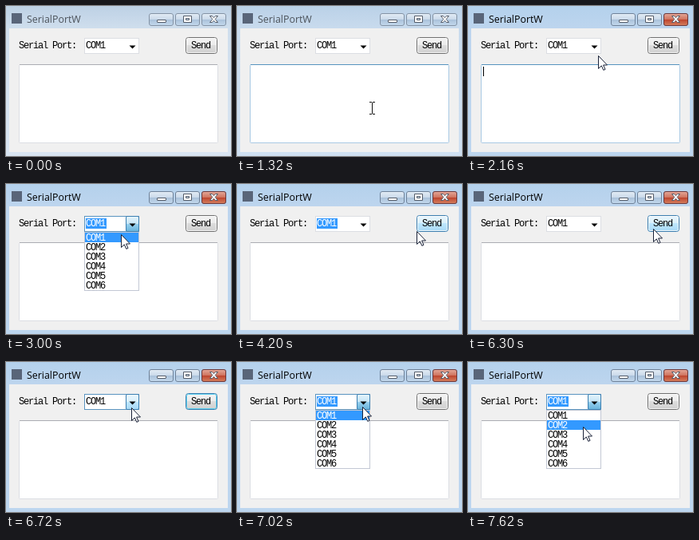
Recreate the animation shown at these times as an HTML page. Size 282 px wide and 188 px high, loop 8 s.

```html
<!DOCTYPE html>
<html lang="en">
<head>
<meta charset="utf-8">
<title>Serial port window</title>
<style>
html, body { margin: 0; width: 100%; height: 100%; overflow: hidden; background: #d3e1f0; }
svg { display: block; width: 282px; height: 188px; }
.ui { font: 12px "Liberation Mono", monospace; letter-spacing: -1.2px; white-space: pre; }
.title { font: 12.4px "Open Sans", "Noto Sans", sans-serif; }
</style>
</head>
<body>
<svg id="stage" viewBox="0 0 282 188" xmlns="http://www.w3.org/2000/svg">
  <defs>
    <linearGradient id="idleGlass" x2="0" y2="1">
      <stop offset="0" stop-color="#bdd1e5"/><stop offset=".15" stop-color="#cfdeed"/><stop offset="1" stop-color="#d9e5f2"/>
    </linearGradient>
    <linearGradient id="liveGlass" x2="0" y2="1">
      <stop offset="0" stop-color="#b4d1ec"/><stop offset=".15" stop-color="#bdd5ee"/><stop offset="1" stop-color="#bdd6ef"/>
    </linearGradient>
    <linearGradient id="capFill" x2="0" y2="1">
      <stop offset="0" stop-color="#e3ecf5"/><stop offset=".48" stop-color="#cbdaea"/>
      <stop offset=".5" stop-color="#a9c1da"/><stop offset="1" stop-color="#c4d9ed"/>
    </linearGradient>
    <linearGradient id="closeFill" x2="0" y2="1">
      <stop offset="0" stop-color="#e3a899"/><stop offset=".48" stop-color="#d0745f"/>
      <stop offset=".5" stop-color="#bd432d"/><stop offset="1" stop-color="#d5805f"/>
    </linearGradient>
    <linearGradient id="plain" x2="0" y2="1">
      <stop offset="0" stop-color="#f3f3f3"/><stop offset=".5" stop-color="#ebebeb"/>
      <stop offset=".5" stop-color="#dddddd"/><stop offset="1" stop-color="#cfcfcf"/>
    </linearGradient>
    <linearGradient id="hot" x2="0" y2="1">
      <stop offset="0" stop-color="#eaf6fd"/><stop offset=".5" stop-color="#d9f0fc"/>
      <stop offset=".5" stop-color="#bee6fd"/><stop offset="1" stop-color="#a7d9f5"/>
    </linearGradient>
    <linearGradient id="pressed" x2="0" y2="1">
      <stop offset="0" stop-color="#e5f4fc"/><stop offset=".5" stop-color="#c4e5f6"/>
      <stop offset=".5" stop-color="#98d1ef"/><stop offset="1" stop-color="#68b3db"/>
    </linearGradient>
  </defs>

  <rect width="282" height="188" fill="url(#idleGlass)"/>
  <rect id="glass" width="282" height="188" fill="url(#liveGlass)"/>
  <rect x="7" y="9" width="13" height="13" fill="#596579"/>
  <text id="title" class="title" x="26" y="21">SerialPortW</text>

  <g id="caps" fill="url(#capFill)">
    <rect x="179.5" y="9.5" width="30" height="15" rx="2.5"/>
    <rect x="212.5" y="9.5" width="30" height="15" rx="2.5"/>
    <rect x="245.5" y="9.5" width="30" height="15" rx="2.5"/>
  </g>
  <rect id="close" x="245.5" y="9.5" width="30" height="15" rx="2.5" fill="url(#closeFill)" stroke="#6d3a3d"/>
  <g fill="#fff" stroke="#535b68">
    <rect x="189.5" y="17.5" width="11" height="3" rx=".5"/>
    <path fill-rule="evenodd" d="M222.5 12.5h10v8h-10zM225.5 15.500h4v2h-4z"/>
    <path d="M255.500 12.500h3l2 2.200 2-2.200h3l-3.300 4 3.300 4h-3l-2-2.200-2 2.200h-3l3.300-4z"/>
  </g>

  <rect x="4" y="28" width="274" height="155" fill="#f0f0f0"/>
  <text class="ui" x="16" y="53">Serial Port:</text>

  <rect id="box" x="16.500" y="73.500" width="249" height="98" rx="1" fill="#fff"/>
  <path id="boxTop" d="M17 73.500H265"/>
  <path id="caret" d="M19.500 76V88" stroke="#000"/>

  <rect id="combo" x="98.500" y="40.500" width="68" height="19" fill="#fff"/>
  <rect id="drop" x="150.500" y="40.500" width="16" height="19" rx="1.500" stroke="#3c7fb1"/>
  <path d="M154.500 49.500h8l-4 4z"/>
  <rect id="pick" x="100" y="43" width="26" height="13" fill="#3399ff"/>
  <text id="value" class="ui" x="100" y="53">COM1</text>

  <rect id="send" x="225.500" y="39.500" width="39" height="20" rx="3"/>
  <rect id="ring" x="226.500" y="40.500" width="37" height="18" rx="2" fill="none"/>
  <text class="ui" x="232" y="53">Send</text>

  <g id="list">
    <rect x="98.500" y="60.500" width="68" height="73" fill="#fff" stroke="#c3c8d4"/>
    <rect id="bar" x="99" width="67" height="12" fill="#3399ff"/>
  </g>

  <path id="arrow" d="M.5 .5V16.500L4.300 12.900 6.800 18.400 9 17.400 6.600 12H11.500Z" fill="#fff" stroke="#1a2238"/>
  <path id="beam" d="M0 .5H3M4 .5H7M3.500 1V15M0 15.500H3M4 15.500H7" fill="none" stroke="#111"/>
</svg>
<script>
const LOOP = 8000;
const $ = id => document.getElementById(id);
const set = (id, attrs) => { for (const k in attrs) $(id).setAttribute(k, attrs[k]); };
const show = (id, on) => set(id, { visibility: on ? 'visible' : 'hidden' });

const items = [1, 2, 3, 4, 5, 6].map((n, i) => {
  const t = document.createElementNS('http://www.w3.org/2000/svg', 'text');
  t.setAttribute('class', 'ui');
  t.setAttribute('x', 100);
  t.setAttribute('y', 71 + 12 * i);
  t.textContent = 'COM' + n;
  $('list').appendChild(t);
  return t;
});

// Each step changes part of the window state at its time.
const steps = [
  [0, { live: 0, tip: null, ibeam: false, boxHot: false, caret: false, open: false,
        picked: false, drop: '', send: 'plain', focus: false, row: 0 }],
  [900, { tip: [187, 173] }],
  [960, { tip: [175, 141], ibeam: true, boxHot: true }],
  [1140, { tip: [168, 129] }],
  [1320, { tip: [166, 120], live: .35 }],
  [1380, { live: 1, caret: true }],
  [1740, { tip: [167, 98] }],
  [1800, { tip: [166, 70], ibeam: false }],
  [2160, { tip: [163, 62] }],
  [2520, { tip: [162, 50], drop: 'hot' }],
  [2580, { drop: 'pressed', open: true, picked: true, boxHot: false, caret: false }],
  [2760, { tip: [161, 50] }],
  [2940, { tip: [152, 57] }],
  [3000, { tip: [144, 63] }],
  [3600, { open: false, drop: '' }],
  [3780, { tip: [178, 63] }],
  [3840, { tip: [207, 63] }],
  [4200, { tip: [225, 59], send: 'hot' }],
  [4260, { tip: [237, 57] }],
  [4860, { tip: [237, 56], send: 'pressed', focus: true, picked: false }],
  [5040, { send: 'hot' }],
  [6300, { tip: [232, 56] }],
  [6480, { tip: [192, 59], send: 'plain' }],
  [6540, { tip: [159, 57], drop: 'hot' }],
  [6720, { tip: [157, 57] }],
  [6900, { tip: [157, 56], drop: 'pressed', focus: false }],
  [6960, { picked: true }],
  [7020, { open: true }],
  [7200, { tip: [154, 57] }],
  [7560, { tip: [149, 69] }],
  [7620, { tip: [144, 81], row: 1 }]
];

function stateAt(t) {
  const s = {};
  for (const [at, change] of steps) if (at <= t) Object.assign(s, change);
  return s;
}

const edge = { plain: '#707070', hot: '#3c7fb1', pressed: '#2c628b' };

function draw(t) {
  const s = stateAt(t);
  const active = s.live === 1;
  const ringed = s.focus && s.send === 'plain';
  set('glass', { opacity: s.live });
  show('close', active);
  set('caps', { stroke: active ? '#6f8299' : '#8493a5' });
  set('title', { fill: active ? '#000' : '#4c535b' });

  set('box', { stroke: s.boxHot ? '#a9c9e3' : '#dcdee3' });
  set('boxTop', { stroke: s.boxHot ? '#5794bf' : '#abadb3' });
  show('caret', s.caret);

  set('combo', { stroke: s.drop ? '#5a94c0' : '#dcdee3' });
  show('drop', s.drop);
  set('drop', { fill: `url(#${s.drop || 'plain'})` });
  show('pick', s.picked);
  set('value', { fill: s.picked ? '#fff' : '#000' });

  set('send', { fill: `url(#${s.send})`, stroke: ringed ? edge.hot : edge[s.send] });
  set('ring', { stroke: ringed ? '#48cdf0' : '#fafafa', 'stroke-opacity': .85 });

  show('list', s.open);
  show('bar', s.open);
  set('bar', { y: 61 + 12 * s.row });
  items.forEach((el, i) => el.setAttribute('fill', i === s.row ? '#fff' : '#000'));

  show('arrow', s.tip && !s.ibeam);
  show('beam', s.tip && s.ibeam);
  if (s.tip) set(s.ibeam ? 'beam' : 'arrow', { transform: `translate(${s.tip})` });
}

const start = performance.now();
function tick() {
  draw((performance.now() - start) % LOOP);
  requestAnimationFrame(tick);
}
tick();
</script>
</body>
</html>
```
